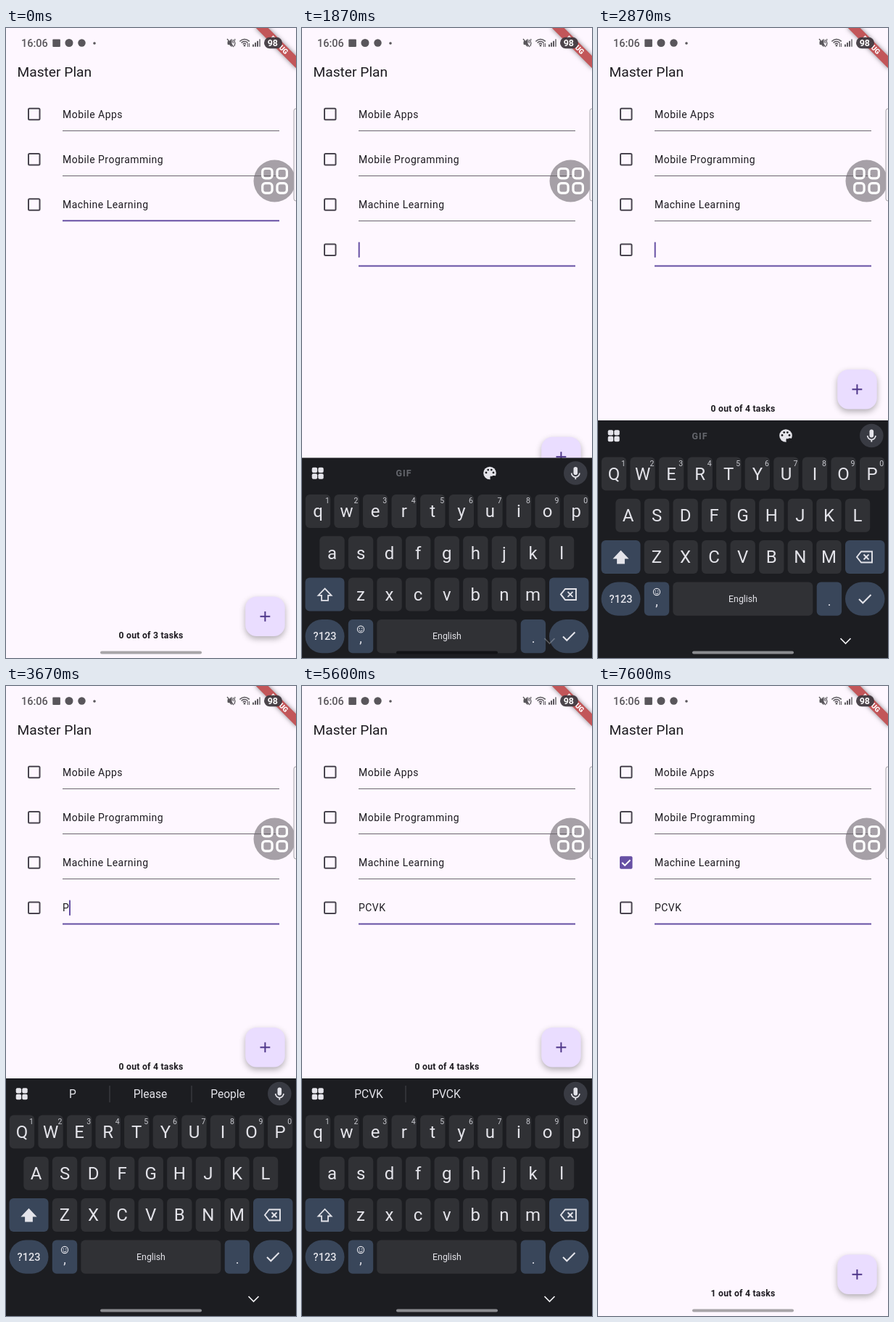
Recreate the animation shown at these times as an HTML page with a canvas. Size 400 px wide and 867 px high, loop 8 s.

```html
<!DOCTYPE html>
<html lang="en">
<head>
<meta charset="utf-8">
<title>Master Plan</title>
<style>
html, body { margin: 0; width: 100%; height: 100%; overflow: hidden; background: #fef7ff; }
canvas { display: block; width: 400px; height: 867px; }
</style>
</head>
<body>
<canvas id="stage"></canvas>
<script>
const W = 400, H = 867, LOOP = 8000;
const canvas = document.getElementById('stage');
const c = canvas.getContext('2d');
const dpr = window.devicePixelRatio || 1;
canvas.width = W * dpr;
canvas.height = H * dpr;

const FACE = 'Roboto, "Open Sans", sans-serif';
const INK = '#1d1b20', GREY = '#49454f', PURPLE = '#6750a4', PAPER = '#fef7ff';
const KEY = '#303135', MOD = '#39465a', GLYPH = '#e4e4ea', BOARD = '#1c1d21';

const clamp = v => Math.max(0, Math.min(1, v));
const ramp = (t, from, to) => clamp((t - from) / (to - from));
const easeOut = (u, n) => 1 - Math.pow(1 - u, n);
const within = (t, from, to) => t >= from && t < to;

// Shapes
function text(str, x, y, size, color, { weight = 400, align = 'left', gap = 0 } = {}) {
  c.font = `${weight} ${size}px ${FACE}`;
  c.letterSpacing = gap + 'px';
  c.textAlign = align;
  c.fillStyle = color;
  c.fillText(str, x, y);
  return c.measureText(str).width;
}
function box(x, y, w, h, r, color) {
  c.fillStyle = color;
  c.beginPath();
  c.roundRect(x, y, w, h, r);
  c.fill();
}
function frame(x, y, w, h, r, width, color) {
  c.strokeStyle = color;
  c.lineWidth = width;
  c.beginPath();
  c.roundRect(x, y, w, h, r);
  c.stroke();
}
function dot(x, y, r, color) {
  c.fillStyle = color;
  c.beginPath();
  c.arc(x, y, r, 0, 7);
  c.fill();
}
function arc(x, y, r, from, to, width, color) {
  c.strokeStyle = color;
  c.lineWidth = width;
  c.beginPath();
  c.arc(x, y, r, from, to);
  c.stroke();
}
function line(points, width, color, { close = false, fill = false } = {}) {
  c.beginPath();
  points.forEach(([x, y]) => c.lineTo(x, y));
  if (close) c.closePath();
  c.strokeStyle = c.fillStyle = color;
  c.lineWidth = width;
  if (fill) c.fill();
  c.stroke();
}
function faded(alpha, draw) {
  if (alpha <= 0) return;
  c.save();
  c.globalAlpha *= alpha;
  draw();
  c.restore();
}
function ripple(x, y, r, t, start, length, color) {
  const u = (t - start) / length;
  if (u < 0 || u >= 1) return;
  faded(.14 * (1 - ramp(u, .55, 1)), () =>
    dot(x, y, r * (.3 + .7 * easeOut(clamp(u * 2), 2)), color));
}

// Timeline
const T = { add: 700, focus: 1600, caps: 2530, lower: 5200, done: 6090, tick: 7200 };
const typed = [[3500, 'P'], [4030, 'PC'], [4290, 'PCV'], [5070, 'PCVK']];
const presses = [['P', 3340, 3500], ['C', 3900, 4030], ['V', 4190, 4300], ['K', 4900, 5070]];
const shiftTaps = [[2410, 2530], [2690, 2820], [5110, 5230]];
const hints = {
  P: ['P', 'Please', 'People'], PC: ['PC', 'PCs'], PCV: ['PCV', 'PVC'], PCVK: ['PCVK', 'PVCK']
};
const entry = t => typed.reduce((s, [at, word]) => t >= at ? word : s, '');

// Share of the keyboard's full height; lead shifts the moves in time.
function rise(t, showLag, hideLead) {
  const up = easeOut(ramp(t - showLag, 1650, 2050), 2.3);
  const down = easeOut(ramp(t + hideLead, 6200, 6500), 1.94);
  return up * (1 - down);
}
function caretOn(t) {
  if (t < T.focus) return Math.floor((t + 370) / 500) % 2 === 1;
  const start = typed.reduce((s, [at]) => t >= at ? at : s, T.focus + 30);
  return t < start || Math.floor((t - start) / 500) % 2 === 0;
}

// App
function checkbox(x, y, u) {
  if (u < 1) frame(x - 7.75, y - 7.75, 15.5, 15.5, 1.5, 2, GREY);
  if (u <= 0) return;
  faded(clamp(u * 2), () => box(x - 8.75, y - 8.75, 17.5, 17.5, 2, PURPLE));
  const v = ramp(u, .4, 1);
  if (v > 0) {
    const a = clamp(v * 2.5), b = ramp(v, .4, 1);
    line([[x - 5.6, y], [x - 5.6 + 3.9 * a, y + 3.9 * a],
      [x - 5.6 + 3.9 * a + 7.4 * b, y + 3.9 * a - 7.4 * b]], 2, '#fff');
  }
}
function row(i, label, t) {
  const y = 118.5 + 62.25 * i;
  const shift = ramp(t, T.focus, T.focus + 170);
  const focus = i === 2 ? 1 - shift : i === 3 ? shift : 0;
  checkbox(38.75, y, i === 2 ? ramp(t, T.tick, T.tick + 200) : 0);
  const w = text(label, 78, y + 5, 13.97, INK, { gap: .485 });
  box(78, Math.floor(y + 22.5), 299, 1, 0, '#6b676f');
  faded(focus, () => box(78, y + 21.3, 299, 2, 0, PURPLE));
  if (i === (t < T.focus ? 2 : 3) && caretOn(t)) box(77.7 + w, y - 10.7, 2, 21.5, 1, PURPLE);
}
function fab(t) {
  c.save();
  c.shadowColor = 'rgba(0,0,0,.3)';
  c.shadowBlur = 8 * dpr;
  c.shadowOffsetY = 3.5 * dpr;
  box(330.2, 782.5, 54.5, 54.5, 15.5, '#eaddff');
  c.restore();
  c.save();
  c.beginPath();
  c.roundRect(330.2, 782.5, 54.5, 54.5, 15.5);
  c.clip();
  ripple(357.4, 809.8, 38, t, 530, 600, '#4f378a');
  c.restore();
  box(350.5, 808.8, 13.8, 2, 0, '#4f378a');
  box(356.4, 802.9, 2, 13.8, 0, '#4f378a');
}
function banner() {
  c.save();
  c.translate(W, 0);
  c.rotate(Math.PI / 4);
  c.save();
  c.shadowColor = 'rgba(0,0,0,.5)';
  c.shadowBlur = 6 * dpr;
  box(-40, 27.2, 80, 11.7, 0, '#cf6b6e');
  c.restore();
  box(-40, 27.2, 80, 11.7, 0, '#c25659');
  text('DEBUG', 0, 36.5, 9.7, '#fff', { weight: 900, align: 'center' });
  c.restore();
}
function app(t) {
  box(0, 0, W, H, 0, PAPER);
  text('Master Plan', 15.5, 67, 19.2, INK);
  ['Mobile Apps', 'Mobile Programming', 'Machine Learning'].forEach((s, i) => row(i, s, t));
  if (t >= T.add) row(3, entry(t), t);
  ripple(38.75, 243, 19.4, t, 7070, 530, PURPLE);
  c.save();
  c.translate(0, -312.5 * rise(t, 57, 52));
  const total = t < T.add ? 3 : 4, ticked = t < T.tick ? 0 : 1;
  text(`${ticked} out of ${total} tasks`, 155.6, 840, 12.2, INK, { weight: 700, gap: .243 });
  fab(t);
  c.restore();
  banner();
}

// Keyboard, drawn from its top edge
function arrow(x, y, filled) {
  line([[x, y - 8.5], [x + 9, y + 1], [x + 4.5, y + 1], [x + 4.5, y + 8],
    [x - 4.5, y + 8], [x - 4.5, y + 1], [x - 9, y + 1]], 1.8, GLYPH, { close: true, fill: filled });
}
function eraser(x, y) {
  line([[x - 11, y], [x - 5, y - 7.5], [x + 10, y - 7.5], [x + 10, y + 7.5], [x - 5, y + 7.5]],
    1.9, GLYPH, { close: true });
  line([[x - 1.5, y - 3.5], [x + 5.5, y + 3.5]], 1.8, GLYPH);
  line([[x + 5.5, y - 3.5], [x - 1.5, y + 3.5]], 1.8, GLYPH);
}
function mic(x, y) {
  dot(x, y, 16.3, '#393b43');
  box(x - 2.8, y - 8.5, 5.6, 11, 2.8, GLYPH);
  arc(x, y, 5.6, 0, Math.PI, 1.7, GLYPH);
  box(x - .9, y + 5.5, 1.8, 3.2, 0, GLYPH);
}
function palette(x, y) {
  dot(x, y, 8.8, GLYPH);
  [[-5, -.5], [-2.3, -4.4], [2.3, -4.4], [5, -.5]].forEach(([a, b]) => dot(x + a, y + b, 1.4, BOARD));
  box(x + .5, y + 3.6, 8, 6, 2, BOARD);
  dot(x + 2.5, y + 2.8, 1.8, GLYPH);
}
function smiley(x, y) {
  arc(x, y, 4.6, 0, 7, 1.1, GLYPH);
  dot(x - 1.7, y - 1.2, .8, GLYPH);
  dot(x + 1.7, y - 1.2, .8, GLYPH);
  arc(x, y + .4, 2.3, .2, Math.PI - .2, 1, GLYPH);
}
function toolbar(t) {
  [14, 22.6].forEach(x => [13.2, 21.8].forEach(y => box(x - .3, y, 7.4, 7.4, 2, GLYPH)));
  mic(377.3, 21);
  if (t >= T.done) return;
  const words = hints[entry(t)];
  if (!words) {
    text('GIF', 140.5, 25.7, 12.5, '#65676d', { weight: 700, align: 'center', gap: 1 });
    palette(259, 21);
    return;
  }
  words.forEach((s, i) => {
    text(s, 92 + 107 * i, 26.6, 15.6, GLYPH, { align: 'center' });
    if (i < 2 && words[i + 1]) box(142.5 + 113 * i, 10, 1, 23, 0, '#45474d');
  });
}
const ROWS = ['qwertyuiop', 'asdfghjkl', 'zxcvbnm'];
const LEFT = [22, 41.5, 81];
function keyboard(t) {
  const caps = within(t, T.caps, T.lower);
  box(0, 0, W, 340, 0, BOARD);
  toolbar(t);
  ROWS.forEach((keys, r) => [...keys].forEach((k, i) => {
    const x = LEFT[r] + 39.57 * i, y = 50.5 + 57.3 * r;
    box(x - 17.2, y, 34.4, 46, 6, KEY);
    text(caps ? k.toUpperCase() : k, x, y + 31.3, 24, GLYPH, { align: 'center' });
    if (r === 0) text((i + 1) % 10, x + 13, y + 12.3, 10.5, '#c9cad0', { align: 'center' });
  }));
  const held = shiftTaps.some(([a, b]) => within(t, a, b));
  box(4.5, 165.1, 54, 46, 6, held ? '#55637a' : MOD);
  arrow(31.5, 188.5, caps);
  box(341, 165.1, 54.5, 46, 6, MOD);
  eraser(368, 188);
  box(4.5, 222.5, 54, 46.3, 23, MOD);
  text('?123', 31.5, 250.8, 14.5, GLYPH, { weight: 500, align: 'center' });
  box(63.8, 222.5, 34.4, 46.3, 6, MOD);
  smiley(81, 236);
  text(',', 81, 255, 18, GLYPH, { align: 'center' });
  box(103.3, 222.5, 193, 46.3, 6, KEY);
  text('English', 200, 249.7, 12.3, GLYPH, { align: 'center' });
  box(301.7, 222.5, 34.4, 46.3, 6, MOD);
  text('.', 319, 255, 18, GLYPH, { align: 'center' });
  box(341, 222.5, 54.5, 46.3, 23, within(t, 6030, 6150) ? '#55637a' : MOD);
  line([[360, 246], [365.3, 251.3], [376.5, 240]], 2, GLYPH);
  presses.forEach(([k, from, to]) => {
    if (!within(t, from, to)) return;
    const r = ROWS.findIndex(s => s.includes(k.toLowerCase()));
    const x = Math.min(LEFT[r] + 39.57 * ROWS[r].indexOf(k.toLowerCase()), 376);
    const y = 50.5 + 57.3 * r;
    box(x - 21, y - 52, 42, 98, 9, '#484a51');
    text(k, x, y - 18, 27, GLYPH, { align: 'center' });
  });
}

// System overlays
function navBar(t) {
  const open = ramp(t, 1750, 2170) * (1 - ramp(t, 6130, 6300));
  faded(open, () => line([[334.5, 840], [341.5, 847], [348.5, 840]], 1.7, '#f2f2f4'));
  if (within(t, 6320, 6480)) dot(353.7, 842.3, 8.6, '#494a4e');
  const bar = within(t, 1680, 1950) ? '#121316' : within(t, 1950, 6300) ? '#8b8c90' : '#a8a5a9';
  box(130, 857.5, 140, 4, 2, bar);
}
function statusBar() {
  const ink = '#59565b';
  text('16:06', 21, 25.6, 14.5, ink, { weight: 500 });
  box(64.3, 15.5, 10.6, 10.6, 1, ink);
  dot(87, 20.5, 5.5, ink);
  dot(104.5, 20.5, 5.2, ink);
  dot(122, 21, 1.8, ink);

  line([[306, 18.5], [308, 18.5], [311, 15.5], [311, 25.5], [308, 22.5], [306, 22.5]], 1, ink,
    { close: true, fill: true });
  line([[305, 15], [314, 26]], 1.3, ink);
  line([[313.5, 16], [312.8, 19], [313.8, 21]], 1.2, ink);
  line([[316, 15], [315, 18], [316, 21], [315, 25]], 1.2, ink);

  [3, 6, 9].forEach(r => arc(329, 24.5, r, -2.4, -.74, 1.5, ink));
  dot(329, 24.3, 1.3, ink);
  line([[333.5, 21], [333.5, 26]], 1, ink);
  line([[335.6, 21], [335.6, 26]], 1, ink);
  [0, 1, 2, 3].forEach(i => box(340 + 3 * i, 22.5 - 2.4 * i, 2, 3.3 + 2.4 * i, .5, i < 3 ? ink : '#8b888d'));

  box(356, 12.8, 25, 15.4, 7.7, 'rgba(62,56,62,.93)');
  text('98', 367.8, 25, 12.5, '#fff', { weight: 700, align: 'center' });
}
function assist() {
  dot(370.5, 210.5, 29, 'rgba(109,104,109,.6)');
  [353.7, 374].forEach(x => [193.5, 213.7].forEach(y => frame(x, y, 13.4, 13.4, 4, 3.2, '#fff')));
  box(397, 111, 8, 127, 3, '#f7f2f8');
  frame(397, 111, 8, 127, 3, 1, '#a9a5ab');
}

function draw(t) {
  c.setTransform(dpr, 0, 0, dpr, 0, 0);
  c.lineJoin = 'miter';
  app(t);
  const up = rise(t, 0, 0);
  if (up > 0) {
    c.save();
    c.translate(0, H - 327 * up);
    keyboard(t);
    c.restore();
  }
  navBar(t);
  statusBar();
  assist();
}
const begin = performance.now();
function tick() {
  draw((performance.now() - begin) % LOOP);
  requestAnimationFrame(tick);
}
tick();
</script>
</body>
</html>
```
